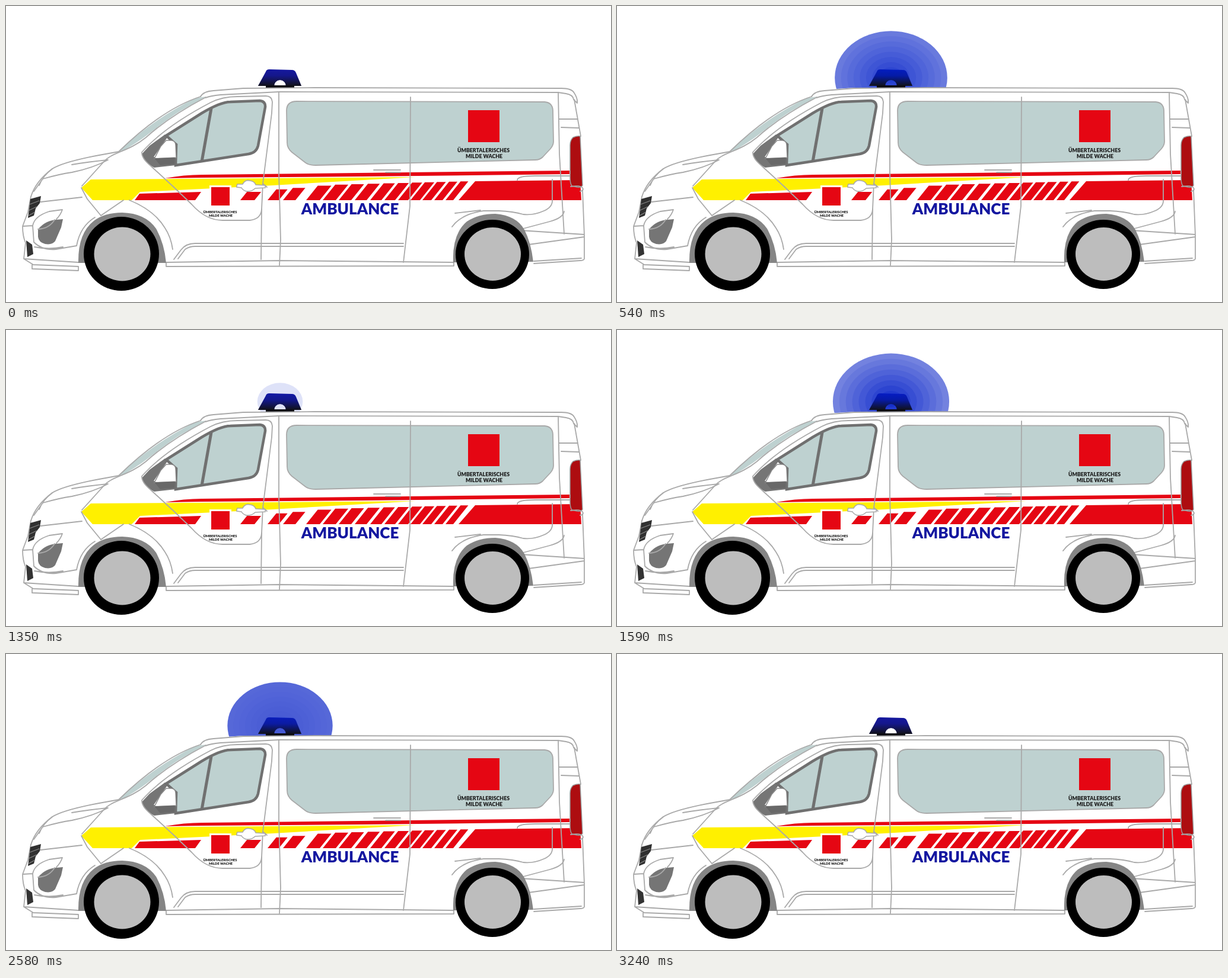
An HTML page that plays this animation: 1020 by 500 pixels, repeating every 3540 ms.

```html
<!DOCTYPE html>
<html lang="de">
<head>
<meta charset="utf-8">
<title>Ambulance</title>
<style>
  html, body { margin: 0; width: 100%; height: 100%; overflow: hidden; background: #fff; }
  svg { display: block; width: 100%; height: 100%; }
  text { font-family: Lato, sans-serif; font-weight: 900; text-anchor: middle; }
  .line { fill: none; stroke: #a9a9a9; stroke-width: 1.8; stroke-linejoin: round; stroke-linecap: round; }
  .glass { fill: #bed1d0; }
  .red { fill: #e50613; }
  .grey { fill: #757575; }
</style>
</head>
<body>
<svg viewBox="0 0 1020 500">
  <defs>
    <linearGradient id="shade" x1="0" y1="107" x2="0" y2="134" gradientUnits="userSpaceOnUse">
      <stop offset="0" stop-color="#111" stop-opacity="0"/>
      <stop offset=".4" stop-color="#111" stop-opacity=".15"/>
      <stop offset="1" stop-color="#111" stop-opacity=".9"/>
    </linearGradient>
    <clipPath id="aboveRoof"><path d="M340 0H600V138H400L370 140H340Z"/></clipPath>
    <path id="dome" d="M438 111Q439 107 444 107L482 108Q487 108 489 113L498 135H472A10 10 0 0 0 452 135H425Z"/>
  </defs>

  <!-- beacon -->
  <use href="#dome" fill="#1518a0"/>
  <g id="glow" clip-path="url(#aboveRoof)"></g>
  <use href="#dome" fill="url(#shade)"/>
  <path d="M438 134H486V138H438Z" fill="#0b0b12"/>

  <!-- windows -->
  <path class="glass" d="M190 246C226 211 271 180 318 156L337 153L300 174C270 190 238 222 200 243Z"/>
  <path class="glass" d="M490 161L908 162Q921 163 922 176L923 229Q923 235 918 241L905 255Q900 260 892 260L522 269Q510 269 504 264L482 247Q474 240 474 231L473 177Q473 161 490 161Z"/>
  <path class="grey" d="M229 250L242 236L268 217L272 222L249 255L287 257L286 269L250 273Q231 264 229 250Z"/>
  <path class="glass" d="M270 219L330 181Q362 162 378 162L428 160Q438 161 437 171L425 236Q422 248 409 250L286 269L287 234Z" stroke="#707070" stroke-width="4.5"/>
  <path d="M346 173L330 263" fill="none" stroke="#707070" stroke-width="5"/>
  <path d="M270 227H279Q286 228 286 235L287 256L250 258L261 237Z" fill="#fff" stroke="#8a8a8a" stroke-width="1.5"/>
  <path d="M250 257L285 256L284 267L260 269Z" fill="#686868"/>

  <!-- livery -->
  <path fill="#fff000" d="M143 293L300 292L690 289L450 303L226 314L212 328H146L127 307Z"/>
  <path class="red" d="M268 291Q300 285 330 285L950 278V284L600 288L330 290Z"/>
  <path class="red" d="M225 317L329 314L319 328H217Z"/>
  <g id="bars" class="red"></g>
  <path class="red" d="M791 296L968 294L970 328H763Z"/>

  <!-- body panels -->
  <path class="line" d="M328 153Q333 144 350 143L400 139L520 138L936 139Q954 139 958 147Q964 156 963 164L957 158Q956 150 944 148L931 146L460 145L362 150Q343 152 337 155"/>
  <path class="line" d="M328 153C279 169 230 207 190 246L157 252C125 258 94 265 78 275Q50 296 42 322"/>
  <path class="line" d="M337 154C301 173 267 194 236 222C207 246 178 247 165 263L128 304"/>
  <path class="line" d="M449 162Q448 152 438 152L390 153Q365 153 345 163C305 184 258 214 229 247Q228 257 245 271L284 307L313 335Q337 362 365 362L411 362Q430 360 431 343L433 300L448 181Z"/>
  <path class="line" d="M460 145V280L463 395L461 438M682 154L681 338L670 433M931 146L933 250L941 385M958 158L969 220M933 191H964M936 205L966 206"/>
  <path class="line" d="M490 161L908 162Q921 163 922 176L923 229Q923 235 918 241L905 255Q900 260 892 260L522 269Q510 269 504 264L482 247Q474 240 474 231L473 177Q473 161 490 161Z"/>
  <path class="line" d="M620 277H665M640 281H665M433 300L440 306M431 343L430 428"/>
  <path class="line" d="M62 292Q90 284 111 281Q146 274 172 260Q140 263 111 268M62 292L47 313M58 331L128 323M127 307L137 326L160 354M78 275Q62 287 56 303"/>
  <path class="line" d="M208 328Q250 345 268 375Q278 390 281 411M160 354L198 328"/>
  <path class="line" d="M283 428L295 412Q303 401 319 401H670M290 427L302 411Q309 406 319 406H670M270 433L461 430L755 433M270 440L755 439V433M270 433V440"/>
  <path class="line" d="M950 287H892Q862 287 862 294M752 373Q768 351 805 346H831Q855 347 872 352Q889 354 907 346Q921 340 921 329V293M757 350L800 345M872 376L917 364Q939 358 941 347M867 379L975 386M881 403L975 390M972 311L975 388V427Q974 430 968 430L890 435M890 431L970 426"/>
  <path class="line" d="M42 322L37 348L28 372Q28 389 33 400L30 427L46 437L122 440V447L44 444V437M30 427L122 433M48 407Q73 412 96 407M45 371Q48 355 73 347L95 344M45 371L47 399Q61 413 84 411L119 405M28 372L45 371M119 405Q125 372 150 357M85 360Q92 353 95 344"/>

  <!-- front details -->
  <path d="M41 326L59 321L57 333L50 342L47 354L37 358L39 343Z" fill="#303030"/>
  <path d="M40 335L56 329M39 345L52 339M38 354L49 348" stroke="#888" stroke-width="1.3"/>
  <path class="grey" d="M54 377Q67 362 85 361L96 360L93 374L83 397Q78 404 66 402Q55 399 54 390Z"/>
  <path class="line" d="M54 377Q73 376 82 361"/>
  <path d="M34 396L44 403L46 419L36 424Z" fill="#333"/>

  <!-- tail light and door handle -->
  <path d="M956 222Q963 219 968 220L972 303Q970 307 963 306L954 304Q951 300 951 290V235Q951 227 956 222Z" fill="#ad0d10" stroke="#999" stroke-width="1.5"/>
  <path class="line" d="M952 305Q971 302 973 309Q973 312 968 313"/>
  <path d="M389 304L390 301H399Q403 293 411 295Q419 296 421 302L437 303V307L420 308Q414 314 405 313Q399 311 397 307L389 306Z" fill="#fff" stroke="#aaa" stroke-width="1.6"/>

  <!-- wheels -->
  <path fill="#858585" d="M122 434Q121 384 148 363Q166 349 196 349Q235 350 253 376Q267 401 270 434Z"/>
  <path fill="#858585" d="M754 433Q752 385 777 364Q797 351 825 351Q861 354 874 378Q885 399 889 432Z"/>
  <ellipse cx="194.5" cy="418.5" rx="63.5" ry="62.5"/>
  <ellipse cx="196" cy="419" rx="47.5" ry="45.5" fill="#bdbdbd"/>
  <ellipse cx="820" cy="419.5" rx="62" ry="58.5"/>
  <ellipse cx="820.5" cy="419" rx="47.5" ry="45" fill="#bdbdbd"/>

  <!-- badges and lettering -->
  <rect class="red" x="779" y="176" width="53" height="54"/>
  <rect class="red" x="344.5" y="304.5" width="34" height="34" stroke="#fff" stroke-width="3"/>
  <g fill="#1a1a1a">
    <text x="805" y="247" font-size="8.8">ÜMBERTALERISCHES</text>
    <text x="806" y="257" font-size="8.8">MILDE WACHE</text>
    <text x="361" y="350" font-size="5.7">ÜMBERTALERISCHES</text>
    <text x="362" y="356" font-size="5.7">MILDE WACHE</text>
  </g>
  <text x="580" y="352" font-size="26" fill="#1417a0">AMBULANCE</text>
</svg>
<script>
  const SVG_NS = 'http://www.w3.org/2000/svg';
  const STEP = 30, LAST_STEP = 108, LOOP = 3540, PULSE_STEPS = 36, PEAK = 16.5;
  const RINGS = 9;

  function add(parent, tag, attributes) {
    const node = document.createElementNS(SVG_NS, tag);
    for (const [name, value] of Object.entries(attributes)) node.setAttribute(name, value);
    return parent.appendChild(node);
  }

  // Slanted bars: left end of the foot and width
  const bars = [[395, 24], [441, 19], [467, 21], [506, 23], [534, 22], [561, 21],
    [588, 20], [614, 19], [638, 18], [661, 17], [682, 16], [702, 15], [722, 14], [741, 13]];
  const barGroup = document.getElementById('bars');
  for (const [x, width] of bars) {
    const top = x < 520 ? 314 - (x - 395) * 0.095 : 302 - (x - 520) * 0.026;
    const lean = (328 - top) * 0.8;
    add(barGroup, 'path', { d: `M${x} 328L${x + lean} ${top}h${width}L${x + width} 328Z` });
  }

  const glow = document.getElementById('glow');
  const rings = Array.from({ length: RINGS }, () => add(glow, 'ellipse', { cx: 462, cy: 121 }));

  const mix = (from, to, amount) => from + (to - from) * amount;

  function draw(time) {
    const step = Math.min(LAST_STEP, Math.floor(time % LOOP / STEP));
    const distance = step % PULSE_STEPS - PEAK;
    const radius = 98.5 * Math.exp(-0.0168 * distance ** 2);
    const core = 0.93 * Math.exp(-0.035 * distance ** 2);
    const rim = Math.min(core, 0.55 + 0.02 * distance ** 2);

    glow.setAttribute('visibility', core < 0.01 ? 'hidden' : 'visible');
    rings.forEach((ring, i) => {
      const size = radius * (1 - i / RINGS);
      const strength = mix(rim, core, i / (RINGS - 1));
      // Each ring adds just enough cover to reach its own strength.
      const below = i ? mix(rim, core, (i - 1) / (RINGS - 1)) : 0;
      ring.setAttribute('rx', size);
      ring.setAttribute('ry', size * 0.83);
      ring.setAttribute('fill', 'rgb(5, 32, 198)');
      ring.setAttribute('fill-opacity', (strength - below) / (1 - below));
    });
  }

  const start = performance.now();
  function tick() {
    draw(performance.now() - start);
    requestAnimationFrame(tick);
  }
  tick();
</script>
</body>
</html>
```
